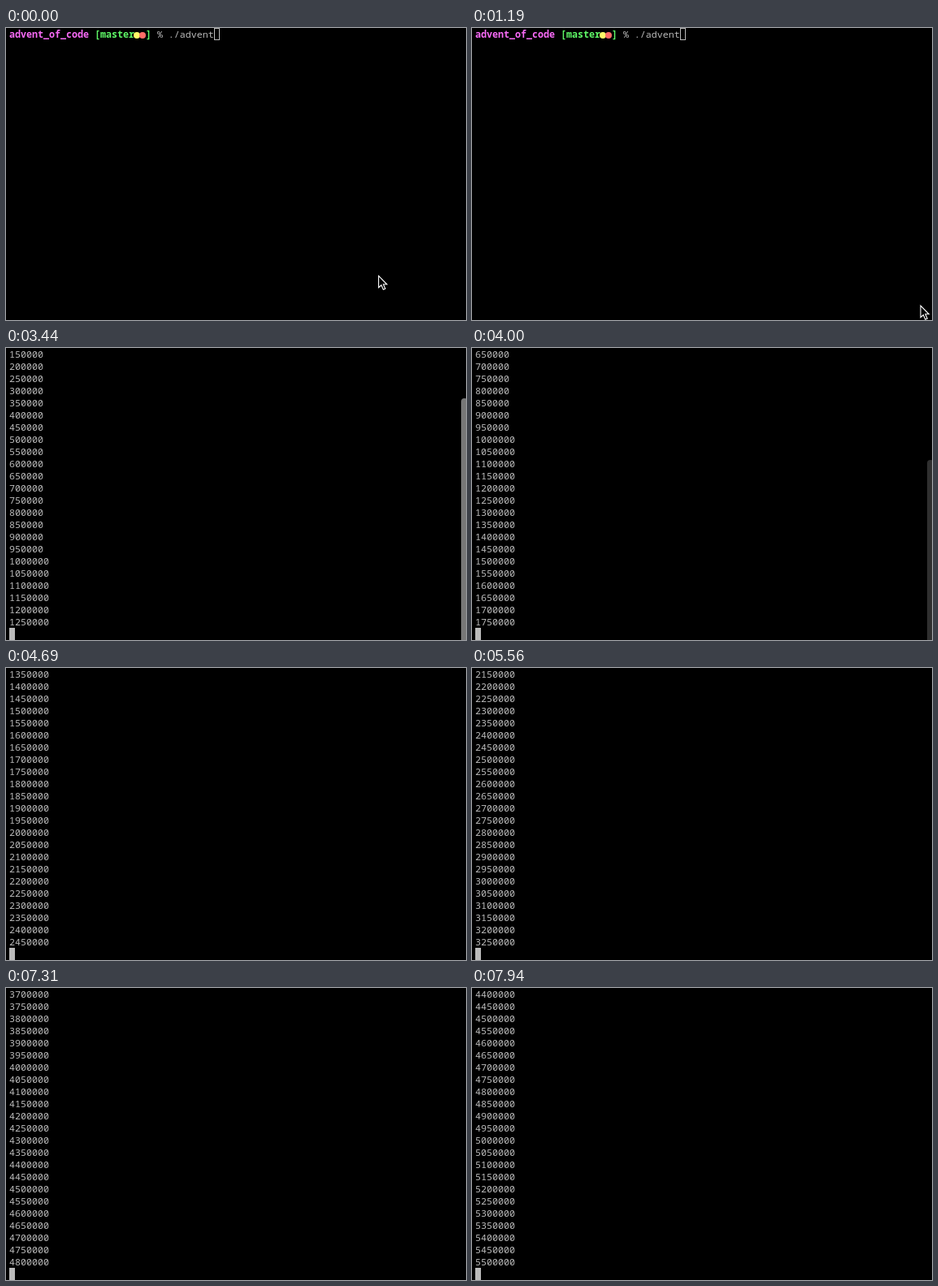
An HTML page for the animation above (8 s loop, 566x360 px).

```html
<!DOCTYPE html>
<html lang="en">
<head>
<meta charset="utf-8">
<title>Terminal counter</title>
<style>
html, body { margin: 0; width: 100%; height: 100%; overflow: hidden; background: #000; }
#stage { position: relative; width: 566px; height: 360px; overflow: hidden; }
#stage > * { position: absolute; }
pre { left: 4px; top: 0; margin: 0; color: #bbb; font: 11.667px/15px "Noto Sans Mono", "DejaVu Sans Mono", monospace; }
b { font-weight: 700; }
.dir { color: #f96bf8; }
.git { color: #5ff967; }
.dot { display: inline-block; width: 8px; height: 8px; margin: 0 -.5px; border-radius: 50%; vertical-align: -.5px; }
#cursor { box-sizing: border-box; width: 7px; height: 15px; border: 1px solid #bbb; }
#bar { left: 560px; bottom: 0; width: 8px; border-radius: 4px 4px 0 0; background: #777; }
#mouse { left: 0; top: 0; overflow: visible; }
</style>
</head>
<body>
<div id="stage">
  <pre id="text"></pre>
  <div id="cursor"></div>
  <div id="bar"></div>
  <svg id="mouse" width="12" height="19"><path d="M.5 .5V15L3.8 12L6.3 17.5L8.7 16.5L6.3 11H10.7Z" stroke="#fff" stroke-width="1.1"/></svg>
</div>
<script>
const LOOP = 8000, TICK = 62.5, ROWS = 24, LINE = 15;
const FOCUS = 20, ENTER = 37, HEADER = 38;
const prompt = '<b class="dir">advent_of_code</b> <b class="git">[master' +
  '<i class="dot" style="background:#fefb67"></i><i class="dot" style="background:#ff6d67"></i>]</b> % ./advent';

// Output stalls: [tick, length]
const stalls = [[55, 2], [66, 2], [78, 3], [92, 3], [108, 3]];
// Lines printed after a number of running ticks
const printed = [[42, 5], [55, 25], [71, 49], [82, 65], [95, 84], [114, 110]];
// Pointer position by tick
const pointer = [[0, 458, 305], [12, 568, 362], [16, 568, 362], [20, 546, 335]];

const $ = id => document.getElementById(id);
const [text, cursor, bar, mouse] = ['text', 'cursor', 'bar', 'mouse'].map($);
const clamp = (v, lo, hi) => Math.min(hi, Math.max(lo, v));

function segment(points, x) {
  let i = 0;
  while (i < points.length - 2 && x >= points[i + 1][0]) i++;
  const [a, b] = [points[i], points[i + 1]];
  const p = (x - a[0]) / (b[0] - a[0]);
  return j => a[j] + (b[j] - a[j]) * p;
}

function countAt(tick) {
  const running = stalls.reduce((n, [at, len]) => n - clamp(tick - at, 0, len), tick);
  return Math.max(0, Math.floor(segment(printed, running)(1) + 1e-6));
}

function draw(t) {
  const tick = Math.floor((t + 3) / TICK);
  const lines = [prompt];
  if (tick >= ENTER) lines.push('');
  if (tick >= HEADER) {
    lines.push('= Solutions for 2020 Day 15');
    for (let n = 1, end = countAt(tick); n <= end; n++) lines.push(n * 50000);
  }

  const entered = tick >= ENTER;
  const row = entered ? lines.length : 0;
  const scroll = Math.max(0, row - ROWS + 1);
  const html = lines.slice(scroll).join('\n');
  if (draw.html !== html) text.innerHTML = draw.html = html;

  cursor.style.left = (entered ? 4 : 256) + 'px';
  cursor.style.top = (row - scroll) * LINE + 'px';
  cursor.style.background = tick >= FOCUS ? '#bbb' : 'none';

  bar.style.height = 360 * ROWS / (ROWS + scroll) + 'px';
  bar.style.opacity = scroll ? clamp((66 - tick) / 5, 0, 1) : 0;

  const at = segment(pointer, Math.min(tick, 20));
  mouse.style.transform = `translate(${at(1)}px, ${at(2)}px)`;
  mouse.style.display = entered ? 'none' : 'block';
}

const start = performance.now();
function frame() {
  draw((performance.now() - start) % LOOP);
  requestAnimationFrame(frame);
}
frame();
</script>
</body>
</html>
```
